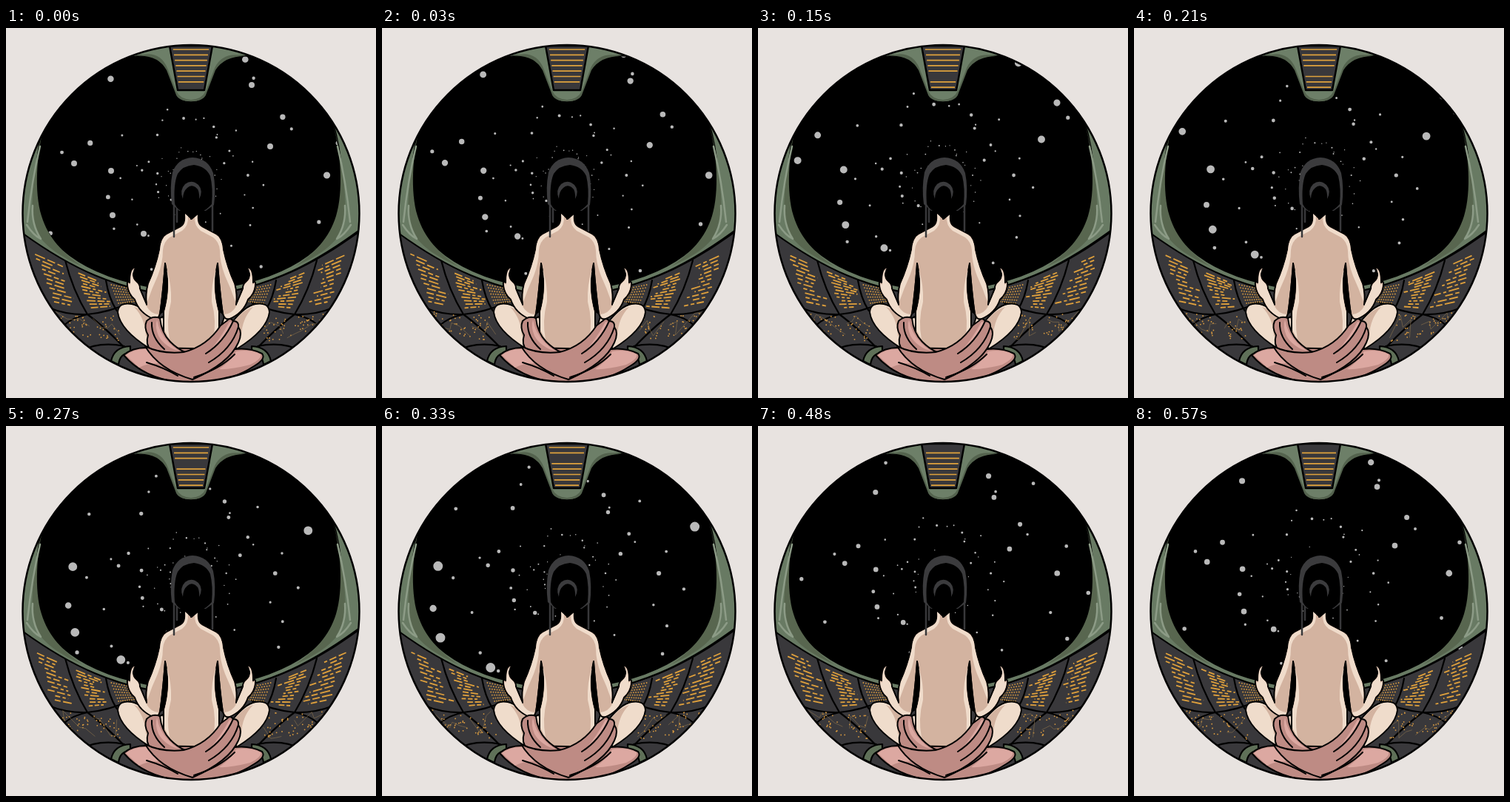
These frames come from a looping animation (500 by 500 pixels, 0.6 s). An HTML page:

```html
<!DOCTYPE html>
<html lang="en">
<head>
<meta charset="utf-8">
<title>Stargazing meditation</title>
<style>
  html, body { margin: 0; width: 100%; height: 100%; overflow: hidden; background: #e8e3e0; }
  svg { display: block; width: 100vw; height: 100vh; }
</style>
</head>
<body>
<svg viewBox="0 0 500 500" fill="none" stroke-linecap="round" stroke-linejoin="round">
  <defs>
    <clipPath id="porthole"><circle cx="250" cy="250.5" r="227.5"/></clipPath>

    <g id="console">
      <path fill="#39383b" d="M0 276H22C80 318 150 358 251 362V500H0Z"/>
      <g stroke="#000" stroke-width="2.2">
        <path d="M22 292Q40 345 58 378Q82 388 110 387Q140 384 168 371"/>
        <path d="M80 314Q90 354 110 387Q132 403 160 432"/>
        <path d="M135 341Q139 365 149 381Q155 388 160 394"/>
        <path d="M78 402Q90 391 110 387M100 437Q126 423 160 430"/>
        <path fill="#5f7058" d="M142 450Q146 431 168 430V439Q154 439 152 455Z"/>
      </g>
    </g>

    <g id="rim">
      <path fill="#687a63" stroke="#000" stroke-width="2"
        d="M53 125C39 170 36 225 47 255C62 305 130 349 251 356V363C150 359 80 319 22 277L4 264V125Z"/>
      <path fill="#58664f" d="M52 130C41 170 38 222 48 254C57 284 78 305 103 322C65 305 43 288 36 262C33 220 42 165 52 130Z"/>
      <path stroke="#8c9b86" stroke-width="2.5" d="M46 160Q35 205 29 262M36 240Q34 265 47 285Q37 280 28 266"/>
    </g>

    <g id="leg" stroke="#000" stroke-width="2">
      <path fill="#efdccb" d="M200 396Q184 376 170 373Q152 370 151 384Q154 408 194 433L224 430L212 390Z"/>
      <path fill="#d3b3a0" stroke="none" d="M199 397Q186 380 173 377Q188 392 189 416L215 426Z"/>
    </g>

    <g id="halfBody">
      <path fill="#d3b3a0" stroke="#000" stroke-width="2"
        d="M251 258L241 248Q243 264 236 268L217 278Q208 283 207 300Q203 322 192 345Q188 360 190 374L181 352Q181 346 177 343Q171 338 172 331Q172 327 175 326Q174 322 171 325Q167 328 167 344Q163 341 164 348Q165 359 174 367Q180 385 199 393Q206 395 208 386Q212 362 215 318Q222 350 213 383V420Q225 440 251 442"/>
      <path d="M215 318Q212 355 208 386L213 383Q222 350 215 318Z" fill="#000" stroke="#000" stroke-width="1.5"/>
      <g fill="#f0dccb">
        <path d="M242 251Q244 265 237 269L218 279Q209 284 208 300Q203 323 193 346Q190 358 191 370Q197 352 205 335Q212 317 212 300Q213 289 221 283L238 274Q247 267 246 254Z"/>
        <path d="M190 376L180 353Q180 347 176 344Q170 339 171 332L173 326Q168 328 168 347L165 345Q166 359 175 366Q181 384 199 392Q204 393 206 387Q195 386 190 376Z"/>
        <path d="M217 326Q223 352 214 384V408L221 421Q216 396 223 370Q224 346 217 326Z"/>
      </g>
    </g>
  </defs>

  <g clip-path="url(#porthole)">
    <rect width="500" height="500" fill="#000"/>
    <path id="stars" fill="#b9b9b9"/>
    <use href="#console"/>
    <use href="#console" transform="matrix(-1 0 0 1 500 0)"/>
    <path id="lights" stroke="#dfa03c" stroke-width="1.8" stroke-linecap="butt"/>
    <path id="dots" stroke="#d89a40" stroke-width="1.8"/>
    <path id="links" stroke="#806a4a" stroke-width=".7"/>
    <use href="#rim"/>
    <use href="#rim" transform="matrix(-1 0 0 1 494 0)"/>

    <path fill="#6d7f68" stroke="#000" stroke-width="1.5"
      d="M172 39Q207 31 217 56L229 87Q232 100 250 100Q268 100 271 87L283 56Q293 34 328 38V10H172Z"/>
    <path fill="#54634e" d="M177 38Q207 28 218 54L230 85Q235 96 250 97Q265 96 270 85L282 54Q293 31 323 38Q295 38 283 57L271 88Q268 99 250 99Q232 99 229 88L217 57Q205 36 177 38Z"/>
    <path fill="#39383b" stroke="#000" stroke-width="2.5" d="M221 24H279L268 84H232Z"/>
    <path id="vent" stroke="#dfa23d" stroke-width="1.7" stroke-linecap="butt"/>

    <use href="#leg"/>
    <use href="#leg" transform="matrix(-1 0 0 1 507 0)"/>
    <use href="#halfBody"/>
    <use href="#halfBody" transform="matrix(-1 0 0 1 501 0)"/>

    <path stroke="#38383a" stroke-width="2.5" d="M227 235V282M231 242V262M279 235V274"/>
    <path fill="#3b3b3d" d="M224 238Q221 216 225 195Q232 176 252 175Q273 176 280 196Q284 216 281 239L270 247H234Z"/>
    <path fill="#000" d="M228 238Q226 211 232 197Q239 186 254 185Q270 187 276 200Q280 216 278 238Q270 247 263 249L251 259L240 249Q232 246 228 238Z"/>
    <path fill="#3b3b3d" d="M239 231Q234 219 242 211Q251 204 260 212Q267 220 261 231Q262 219 256 215Q250 211 245 216Q239 221 239 231Z"/>

    <g fill="#be8b84" stroke="#000" stroke-width="2">
      <path d="M159 442Q170 432 190 432L310 434Q330 432 346 440Q352 447 335 457Q300 480 250 480Q190 478 159 442Z"/>
      <path fill="#dca8a1" stroke="none" d="M162 442Q174 433 190 434Q198 444 214 453Q190 452 180 459ZM311 437Q330 434 344 441Q346 447 330 455Q302 462 288 461Q304 450 311 437Z"/>
      <path d="M190 396Q198 388 208 392Q210 412 222 424Q232 434 242 438Q215 444 196 436Q188 428 192 415Q186 405 190 396Z"/>
      <path d="M188 430Q210 441 240 438Q272 430 290 402L298 396Q303 390 307 396Q315 396 314 404Q320 412 314 425Q302 453 252 475Q207 462 188 430Z"/>
      <path fill="#dca8a1" stroke="none" d="M204 394Q207 412 220 425Q230 435 236 437Q215 432 206 416Q201 404 204 394ZM302 397L306 398Q298 422 274 438Q291 418 302 397Z"/>
      <path fill="none" d="M307 396Q294 425 270 440M314 404Q305 434 274 452M197 398Q196 418 214 434M309 441Q289 461 254 472M190 452Q214 459 232 470"/>
    </g>
  </g>
  <circle cx="250" cy="250.5" r="227.5" stroke="#000" stroke-width="2.5"/>
</svg>

<script>
const LOOP = 600, STEP = 30, STEPS = LOOP / STEP;
const CENTER = { x: 250, y: 199 }, GROWTH = 0.00145;
const byId = id => document.getElementById(id);

const noise = seed => {
  const v = Math.sin(seed * 127.1 + 311.7) * 43758.5453;
  return v - Math.floor(v);
};

// Each track carries one star per loop; growth over a loop moves it to its successor's place.
const polar = (angle, reach, weight) => ({
  dx: reach * Math.cos(angle), dy: reach * Math.sin(angle), r: reach * weight
});
const landmarks = [[142, 193], [92, 183], [144, 253], [186, 278], [357, 160], [332, 77]]
  .map(([x, y]) => ({ dx: x - CENTER.x, dy: y - CENTER.y, r: 4 }));
const scattered = Array.from({ length: 32 }, (_, i) =>
  polar(i * 2.4, 90 * Math.exp(GROWTH * LOOP * noise(i)), i % 5 ? 0.014 : 0.025));
const tracks = [...landmarks, ...scattered];

function drawStars(time) {
  let d = '';
  for (const { dx, dy, r } of tracks) {
    for (const lap of [-2, -1, 0]) {
      const zoom = Math.exp(GROWTH * (time + lap * LOOP));
      const size = Math.max(0.65, r * zoom).toFixed(2);
      const x = CENTER.x + dx * zoom - size, y = CENTER.y + dy * zoom;
      d += `M${x.toFixed(2)} ${y.toFixed(2)}a${size} ${size} 0 1 0 ${2 * size} 0` +
        `a${size} ${size} 0 1 0 ${-2 * size} 0`;
    }
  }
  byId('stars').setAttribute('d', d);
}

// Seams of the left half of the console, from the outside in.
const upper = [[27, 290], [80, 316], [135, 342], [185, 354]];
const middle = [[58, 378], [110, 387], [150, 380], [190, 371]];
const lower = [[84, 412], [126, 424], [160, 428]];

const lerp = (a, b, k) => a + (b - a) * k;
const along = ([ax, ay], [bx, by], k) => [lerp(ax, bx, k), lerp(ay, by, k)];

// Returns a function that places (u, v) inside one panel, clear of its seams.
function panel(top, bottom, i, mirrored) {
  return (u, v) => {
    const a = lerp(0.12, 0.9, u), b = lerp(0.1, 0.92, v);
    const [x, y] = along(along(top[i], top[i + 1], a), along(bottom[i], bottom[i + 1], a), b);
    return `${(mirrored ? 500 - x : x).toFixed(1)} ${y.toFixed(1)}`;
  };
}

function textRows(place, key, step, rows = 11) {
  let d = '';
  for (let row = 0; row < rows; row++) {
    const seed = key * 100 + (row + step) % STEPS;
    const v = (row + 0.5) / rows, end = 0.5 + 0.5 * noise(seed);
    let u = 0.2 * noise(seed + 0.3);
    for (let word = 0; u < end; word++) {
      const next = Math.min(end, u + 0.1 + 0.25 * noise(seed + word * 7.3));
      d += `M${place(u, v)}L${place(next, v)}`;
      u = next + 0.08;
    }
  }
  return d;
}

function dotGrid(place, cols = 11, rows = 7) {
  let d = '';
  for (let i = 0; i < cols * rows; i++) {
    d += `M${place(i % cols / cols, Math.floor(i / cols) / rows)}h.01`;
  }
  return d;
}

function constellation(place, key, step) {
  let dots = '', links = '';
  for (let i = 0; i < 22; i++) {
    const seed = key * 60 + i + step * 23;
    dots += `M${place(noise(seed), noise(seed + 0.5))}h.01`;
    if (i < 5) links += (i ? 'L' : 'M') + place(i / 4, noise(seed + 0.7));
  }
  return { dots, links };
}

function drawConsole(step) {
  let lights = '', dots = '', links = '';
  for (const side of [0, 1]) {
    for (const i of [0, 1]) {
      const key = 1 + i + side * 2;
      lights += textRows(panel(upper, middle, i, side), key, step);
      const chart = constellation(panel(middle, lower, i, side), key, step);
      dots += chart.dots;
      links += chart.links;
    }
    dots += dotGrid(panel(upper, middle, 2, side));
  }
  byId('lights').setAttribute('d', lights);
  byId('dots').setAttribute('d', dots);
  byId('links').setAttribute('d', links);
}

// Stacked bars with one gap that climbs from bottom to top.
function drawVent(time) {
  const gap = Math.max(0, 7 - Math.round(time / 65));
  let d = '';
  for (let i = 0; i < 8; i++) {
    if (i === gap) continue;
    const y = 29 + i * 7.3, inset = (y - 24) * 0.16;
    d += `M${225 + inset} ${y}H${275 - inset}`;
  }
  byId('vent').setAttribute('d', d);
}

const start = performance.now();
let shown = -1;
function tick() {
  const step = Math.floor((performance.now() - start) / STEP) % STEPS;
  if (step !== shown) {
    shown = step;
    drawStars(step * STEP);
    drawConsole(step);
    drawVent(step * STEP);
  }
  requestAnimationFrame(tick);
}
tick();
</script>
</body>
</html>
```
